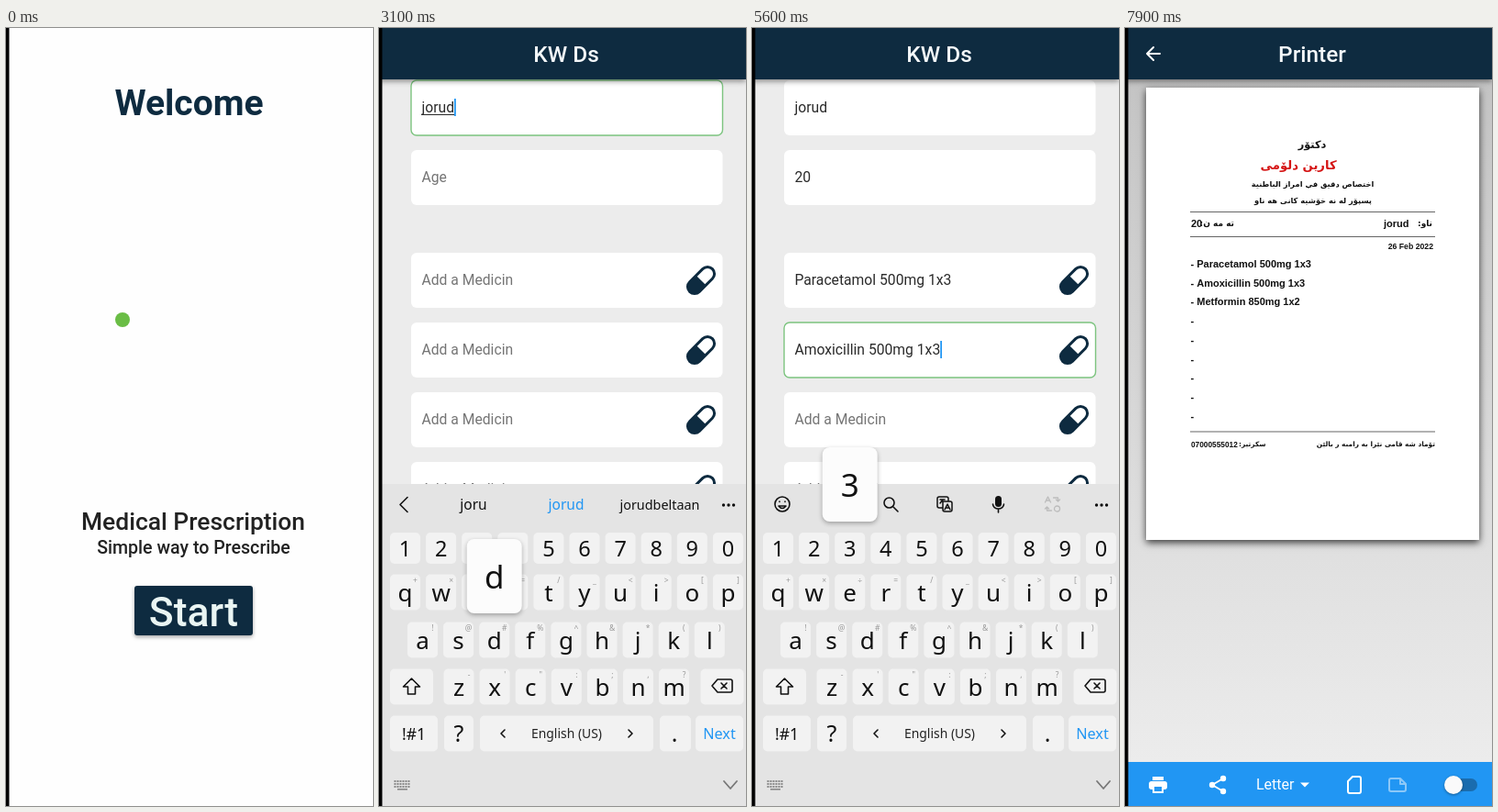
These frames come from a looping animation (400x848 px, 8000 ms). An HTML page with a canvas:

```html
<!DOCTYPE html>
<html lang="en">
<head>
<meta charset="utf-8">
<title>Prescription app</title>
<style>
html, body { margin: 0; width: 100%; height: 100%; overflow: hidden; background: #fefefe; }
canvas { display: block; width: 400px; height: 848px; }
</style>
</head>
<body>
<canvas id="stage"></canvas>
<script>
const LOOP = 8000, STEP = 100;
const NAVY = '#0e2b40', DARK = '#2b2b2b', BLUE = '#2196f3', GREEN = '#7cc47f';
const ROBOTO = 'Roboto, sans-serif';
const NOTO = '"Noto Sans", "Open Sans", sans-serif';
const PRINT = '"Liberation Sans", Arial, sans-serif';
const ARABIC = '"DejaVu Sans", sans-serif';
const APP = 'KW Ds', PATIENT = 'jorud';
const MEDS = ['Paracetamol 500mg 1x3', 'Amoxicillin 500mg 1x3', 'Metformin 850mg 1x2'];

const canvas = document.getElementById('stage');
const ratio = window.devicePixelRatio || 1;
canvas.width = 400 * ratio;
canvas.height = 848 * ratio;
const c = canvas.getContext('2d');

// Fields in the order they are filled: top edge, hint, value, focus and typing times.
const fields = [
  { y: 57, hint: 'Name', value: PATIENT, focus: 2300, start: 2600, end: 3100 },
  { y: 133, hint: 'Age', value: '20', focus: 3300, start: 3300, end: 3500 },
  { value: MEDS[0], focus: 3600, start: 3600, end: 4500 },
  { value: MEDS[1], focus: 4700, start: 4700, end: 5600 },
  { value: MEDS[2], focus: 5700, start: 5700, end: 6500 }
];
for (let i = 0; i < 9; i++) {
  const f = fields[i + 2] || (fields[i + 2] = { value: '', focus: 1e9, start: 1e9, end: 1e9 });
  f.y = 245 + 76 * i;
  f.hint = 'Add a Medicin';
  f.pill = true;
}

const clamp = v => Math.max(0, Math.min(1, v));
const ease = v => { v = clamp(v); return v * v * (3 - 2 * v); };
const mix = (a, b, k) => a + (b - a) * k;

function text(s, x, y, size, color, { align = 'center', weight = 400, font = ROBOTO, dir = 'ltr' } = {}) {
  c.font = `${weight} ${size}px ${font}`;
  c.textAlign = align;
  c.direction = dir;
  c.fillStyle = color;
  c.fillText(s, x, y);
}

function rect(x, y, w, h, color, r = 0) {
  c.beginPath();
  c.roundRect(x, y, w, h, r);
  c.fillStyle = color;
  c.fill();
}

function shadowRect(x, y, w, h, color, r, blur, dy, shade) {
  c.save();
  c.shadowColor = shade;
  c.shadowBlur = blur * ratio;
  c.shadowOffsetY = dy * ratio;
  rect(x, y, w, h, color, r);
  c.restore();
}

function disc(x, y, r, color) {
  c.beginPath();
  c.arc(x, y, r, 0, 7);
  c.fillStyle = color;
  c.fill();
}

function icon(x, y, d, color = '#111', line = 1.6) {
  c.save();
  c.translate(x, y);
  c.lineCap = c.lineJoin = 'round';
  c.lineWidth = line;
  c.strokeStyle = c.fillStyle = color;
  const path = new Path2D(d);
  if (line) c.stroke(path); else c.fill(path);
  c.restore();
}

function header(title) {
  shadowRect(0, 0, 400, 56, NAVY, 0, 6, 2, 'rgba(0,0,0,.45)');
  text(title, 204, 37, 24.4, '#f4f8fa', { weight: 500 });
}

function welcome(t) {
  rect(0, 0, 400, 848, '#fefefe');
  text('Welcome', 199.5, 95, 39, NAVY, { weight: 700 });
  const k = clamp(t / 1800);
  disc(mix(127, 205, k), mix(318, 361, k), mix(8, 78, k), '#6abd45');
  text('Medical Prescription', 204, 546.5, 26.4, '#222', { weight: 500 });
  text('Simple way to Prescribe', 204.5, 573, 19.6, '#222', { weight: 500 });
  shadowRect(140, 608, 129, 54, NAVY, 3, 4, 2, 'rgba(0,0,0,.35)');
  text('Start', 204.5, 651.5, 44.5, '#eaf5f3', { weight: 500 });
}

function pill(x, y) {
  c.save();
  c.translate(x, y);
  c.rotate(-Math.PI / 4);
  c.beginPath();
  c.roundRect(-17.5, -7.5, 35, 15, 7.5);
  c.lineWidth = 3;
  c.strokeStyle = NAVY;
  c.stroke();
  rect(-17.5, -7.5, 17.5, 15, NAVY, [7.5, 0, 0, 7.5]);
  c.restore();
}

const typed = (f, t) => f.value.slice(0, Math.floor(f.value.length * clamp((t - f.start) / (f.end - f.start)) + 1e-6));

function form(t, current) {
  rect(0, 0, 400, 848, '#ececec');
  const scroll = 238 * ease((t - 6800) / 300);
  c.save();
  c.translate(0, -scroll);
  for (const f of fields) {
    const value = typed(f, t), focused = f === current && t < 6750;
    rect(35, f.y, 339.5, 60, '#fff', 6);
    if (focused) {
      c.beginPath();
      c.roundRect(35, f.y, 339.5, 60, 6);
      c.lineWidth = 1.4;
      c.strokeStyle = GREEN;
      c.stroke();
    }
    text(value || f.hint, 46.5, f.y + 35, 15.7, value ? DARK : '#757575', { align: 'left' });
    if (focused && t < f.end + 50) {
      const w = value ? c.measureText(value).width : 0;
      rect(46.5 + w, f.y + 20, 1.8, 19, BLUE);
      const word = composing(value);
      if (word) {
        const u = c.measureText(word).width;
        rect(46.5 + w - u, f.y + 37, u, 1, DARK);
      }
    }
    if (f.pill) pill(351, f.y + 30);
  }
  shadowRect(34.5, 959, 340, 103, NAVY, 3, 4, 2, 'rgba(0,0,0,.35)');
  text('Save', 204.5, 1024, 39, '#f2f8f8', { weight: 500 });
  c.restore();
  header(APP);
}

const composing = s => (/(?:^|\s)([a-z]+)$/i.exec(s) || [])[1];

// Each key row: characters, first centre, middle, baseline, key height, small symbols.
const rows = [
  ['1234567890', 28.5, 567, 576, 34, ''],
  ['qwertyuiop', 28.5, 615, 625, 39, '+×÷=/_<>[]'],
  ['asdfghjkl', 47.5, 667, 677, 39, '!@#%^&*()'],
  ['zxcvbnm', 87, 718, 728, 39, '-\'":;,?']
];
const PITCH = 39.1;
const key = (x, y, w, h = 39) => rect(x - w / 2, y - h / 2, w, h, '#f2f2f2', 5);

function toolbar(word) {
  const o = { font: NOTO };
  if (word) {
    icon(27, 519.5, 'M4-8L-4 0L4 8');
    text(word.slice(0, -1), 103, 525, 15.5, '#111', o);
    text(word, 204, 525, 15.5, BLUE, o);
    text(PATIENT.startsWith(word) ? PATIENT + 'beltaan' : word + 's', 306, 525, 14.4, '#111', o);
  } else {
    icon(33, 519, 'M8 0A8 8 0 1 1-8 0A8 8 0 1 1 8 0M-4 2Q0 7 4 2ZM-3-3v.4M3-3v.4');
    icon(92, 519, 'M-2-8h4l1 3l3-1l2 3.5l-2 2.5l2 2.5l-2 3.5l-3-1l-1 3h-4l-1-3l-3 1l-2-3.5l2-2.5l-2-2.5l2-3.5l3 1ZM3 0A3 3 0 1 1-3 0A3 3 0 1 1 3 0', '#111', 1.4);
    icon(151, 519, 'M4-1.5A5.5 5.5 0 1 1-7-1.5A5.5 5.5 0 1 1 4-1.5M2.5 2.5L8 8');
    icon(210, 519, 'M-2 4h-4a2 2 0 0 1-2-2v-8a2 2 0 0 1 2-2h8a2 2 0 0 1 2 2v2M-2-3h8a2 2 0 0 1 2 2v7a2 2 0 0 1-2 2h-6a2 2 0 0 1-2-2ZM0 6L3 0L6 6M1 4h4M-5-5h5M-5-1l3-4', '#111', 1.5);
    rect(265, 510, 7, 12, '#111', 3.5);
    icon(268.5, 519, 'M-6 0a6 5 0 0 0 12 0M0 5v4');
    icon(327.5, 519, 'M-8-2l3-6l3 6M-7-4h4M1-7h5v4M4-5l2 2l2-2M-1 7h-5v-4M-8 5l2-2l2 2M8 5A3 3 0 1 1 2 5A3 3 0 1 1 8 5', '#bcbcbc', 1.3);
  }
  for (let i = -1; i < 2; i++) disc(381 + i * 5.5, 520, 1.7, '#111');
}

function keyboard(t, current) {
  const up = ease((t - 2300) / 200) * (1 - ease((t - 6600) / 200));
  if (!up) return;
  const value = typed(current, t), o = { font: NOTO };
  c.save();
  c.translate(0, 351 * (1 - up));
  rect(0, 497, 400, 351, '#e4e4e4');
  toolbar(composing(value));
  const last = t <= current.end ? value.slice(-1).toLowerCase() : '';
  let popup;
  rows.forEach(([chars, x0, mid, base, h, small], r) => {
    [...chars].forEach((ch, i) => {
      const x = x0 + PITCH * i;
      key(x, mid, 33, h);
      text(ch, x, base, r ? 26 : 23.5, '#111', o);
      if (small) text(small[i], x + 11, mid - 10, 8.5, '#999', o);
      if (ch === last) popup = [x, mid];
    });
  });
  key(35.5, 718, 47);
  icon(35.5, 718, 'M0-9L9 0H4V8H-4V0H-9Z');
  key(374, 718, 47);
  icon(374, 717, 'M-11 0L-5-7H9a2 2 0 0 1 2 2V5a2 2 0 0 1-2 2H-5ZM-1-3L5 3M5-3L-1 3');
  key(38, 769, 52);
  text('!#1', 38, 776, 17.5, '#111', { ...o, weight: 500 });
  key(87, 769, 32);
  text('?', 87, 778, 25, '#111', o);
  key(204.5, 769, 189);
  icon(135, 769, 'M2-4L-2 0L2 4');
  icon(274, 769, 'M-2-4L2 0L-2 4');
  text('English (US)', 204.5, 774, 13.9, '#222', o);
  key(323, 769, 34);
  text('.', 322, 778, 25, '#111', o);
  key(371, 769, 52);
  text('Next', 371, 775, 16.2, BLUE, o);
  if (t < 6600) {
    for (let r = 0; r < 3; r++)
      for (let i = 0; i < 6; i++) rect(16.5 + i * 3, 820 + r * 3, 2, 2, '#888');
    rect(20, 829, 11, 1.6, '#888');
    icon(383, 825, 'M-7-4L0 4L7-4', '#777', 1.8);
  }
  if (popup) {
    const x = Math.max(36, Math.min(367, popup[0])), y = popup[1];
    shadowRect(x - 30, y - 110, 60, 81, '#fcfcfc', 8, 5, 2, 'rgba(0,0,0,.3)');
    text(last, x, y - 56, 35, '#111', o);
  }
  c.restore();
}

function paper() {
  shadowRect(23, 65, 363, 493, '#fff', 0, 8, 3, 'rgba(0,0,0,.75)');
  const rtl = { font: ARABIC, weight: 700, dir: 'rtl' };
  const bold = { font: PRINT, weight: 700, align: 'left' };
  const left = { ...rtl, align: 'left' }, right = { ...rtl, align: 'right' };
  text('دکتۆر', 204, 131, 11.3, '#111', rtl);
  text('کارین دلۆمی', 189, 154, 13.2, '#d51515', rtl);
  text('اختصاص دقيق في امراز الباطنية', 204.5, 173, 8.3, '#111', rtl);
  text('پسپۆر له نه خۆشیه کانی هه ناو', 205, 191, 8.3, '#111', rtl);
  for (const y of [200, 227, 439.5]) rect(71, y, 267, 1, '#666');
  text('ناو:', 335, 216, 9, '#111', right);
  text(PATIENT, 282, 216.5, 11, '#111', bold);
  text('ته مه ن:', 119, 216, 9, '#111', right);
  text('20', 72, 216.5, 11, '#111', bold);
  text('26 Feb 2022', 336, 241, 8.7, '#111', { ...bold, align: 'right' });
  for (let i = 0; i < 9; i++)
    text('- ' + (MEDS[i] || ''), 71.5, 261 + i * 20.7, 11, '#111', bold);
  text('07000555012', 72, 456.5, 8.3, '#111', bold);
  text('سکرتیر:', 124, 456, 7.4, '#111', left);
  text('تۆماد شه قامی نێرا به رامبه ر بالێن', 338, 456, 7.4, '#111', right);
}

function printer(t) {
  const bg = c.createLinearGradient(0, 56, 0, 800);
  bg.addColorStop(0, '#c4c4c4');
  bg.addColorStop(1, '#ececec');
  rect(0, 0, 400, 848, bg);
  if (t >= 7700) paper();
  header('Printer');
  icon(31, 28, 'M7 0H-7M0-7L-7 0L0 7', '#fff', 2);
  rect(0, 800, 400, 48, BLUE);
  rect(30, 816, 12, 4, '#fff');
  rect(26, 821, 20, 9, '#fff', 3);
  rect(30, 826, 12, 8, '#fff');
  rect(32, 827, 8, 5, BLUE);
  icon(101, 825, 'M6-7L-6 0L6 7', '#fff', 2);
  disc(107, 818, 3.2, '#fff');
  disc(95, 825, 3.2, '#fff');
  disc(107, 832, 3.2, '#fff');
  text('Letter', 143, 830, 16, '#fff', { align: 'left' });
  icon(196, 825, 'M-5-2.5H5L0 2.5Z', '#fff', 0);
  icon(250, 825, 'M-2-9H5a2 2 0 0 1 2 2V7a2 2 0 0 1-2 2H-5a2 2 0 0 1-2-2V-4Z', '#fff', 2);
  icon(297, 825, 'M-7-7H3L9-1V5a2 2 0 0 1-2 2H-7a2 2 0 0 1-2-2V-5a2 2 0 0 1 2-2ZM3-7V-1H9', '#8cc8f8', 2);
  rect(349, 818, 35, 14, '#1a6cae', 7);
  shadowRect(348, 815, 20, 20, '#fafafa', 10, 3, 1, 'rgba(0,0,0,.4)');
}

// Pages enter fading in while rising.
function enter(k, draw) {
  if (k <= 0) return;
  c.save();
  c.globalAlpha = clamp(k);
  c.translate(0, 60 * (1 - ease(k)));
  draw();
  c.restore();
}

function render(t) {
  c.setTransform(ratio, 0, 0, ratio, 0, 0);
  const current = fields.filter(f => t >= f.focus).pop() || { value: '', start: 0, end: 1 };
  if (t < 2200) welcome(t);
  if (t >= 2000 && t < 7700) enter((t - 1900) / 300, () => form(t, current));
  if (t >= 2300 && t < 6800) keyboard(t, current);
  enter((t - 7400) / 200, () => printer(t));
  rect(0, 0, 3.5, 848, '#000');
}

const origin = performance.now();
function frame() {
  const t = (performance.now() - origin) % LOOP;
  render(Math.floor(t / STEP) * STEP);
  requestAnimationFrame(frame);
}
frame();
</script>
</body>
</html>
```
